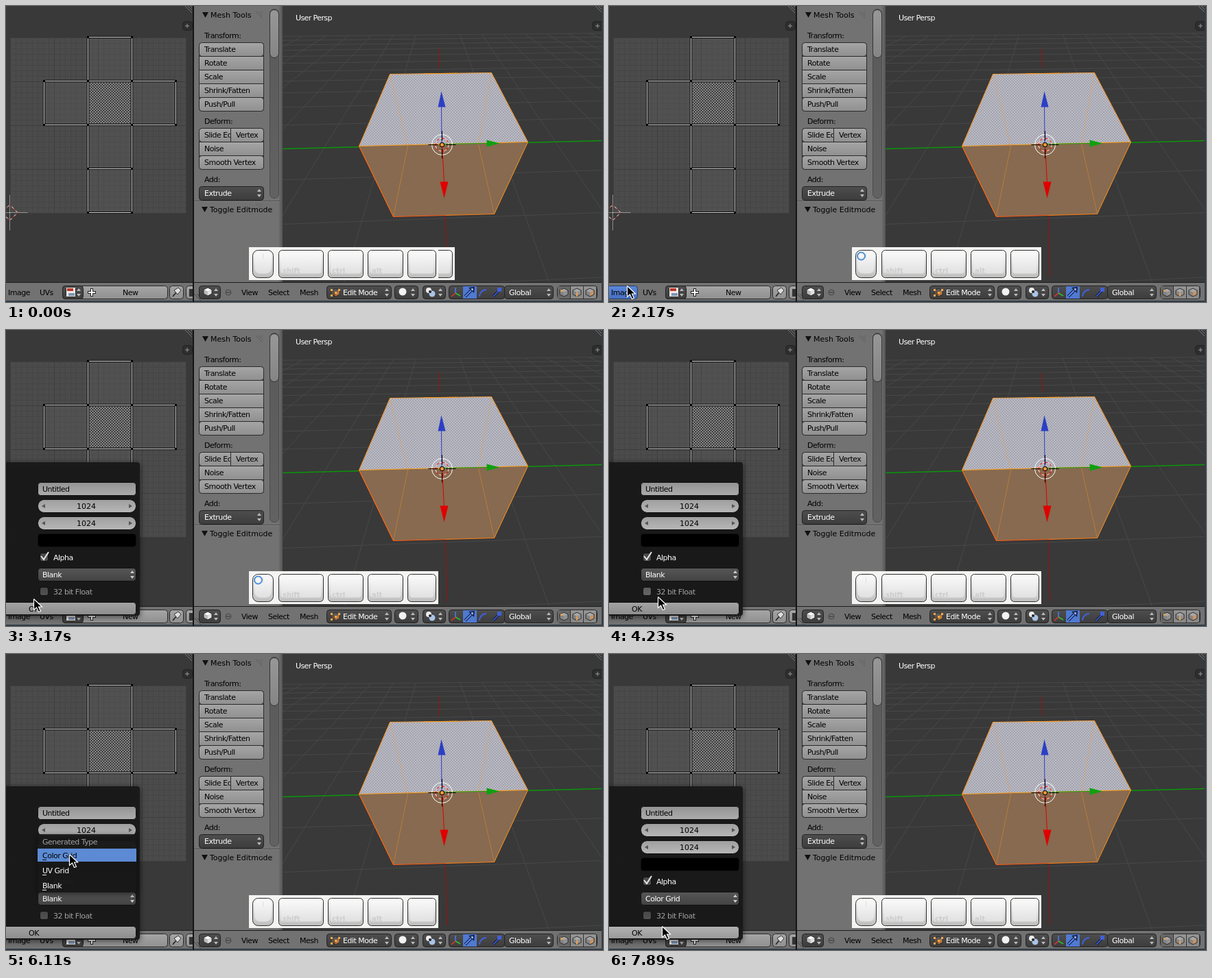
An HTML page with a canvas for the animation above (8 s loop, 870 by 432 pixels).

```html
<!DOCTYPE html>
<html lang="en">
<head>
<meta charset="utf-8">
<title>UV editor</title>
<style>
html, body { margin: 0; width: 100%; height: 100%; overflow: hidden; background: #393939; }
canvas { display: block; }
</style>
</head>
<body>
<canvas id="stage" width="870" height="432"></canvas>
<script>
const W = 870, H = 432, LOOP = 8000;
const screen = document.getElementById('stage').getContext('2d');
let g = screen;

// ---- drawing helpers ----
function rect(x, y, w, h, color) { g.fillStyle = color; g.fillRect(x, y, w, h); }

function line(points, color, width = 1) {
  g.beginPath();
  for (let i = 0; i < points.length; i += 2) g.lineTo(points[i], points[i + 1]);
  g.strokeStyle = color;
  g.lineWidth = width;
  g.stroke();
}

function poly(points, fill) {
  g.beginPath();
  for (let i = 0; i < points.length; i += 2) g.lineTo(points[i], points[i + 1]);
  g.closePath();
  g.fillStyle = fill;
  g.fill();
}

function ring(x, y, r, color, width = 1, dash = []) {
  g.setLineDash(dash);
  g.beginPath();
  g.arc(x, y, r, 0, Math.PI * 2);
  g.strokeStyle = color;
  g.lineWidth = width;
  g.stroke();
  g.setLineDash([]);
}

function disc(x, y, r, color) {
  g.beginPath();
  g.arc(x, y, r, 0, Math.PI * 2);
  g.fillStyle = color;
  g.fill();
}

function box(x, y, w, h, r, top, bottom = top, edge = '#2a2a2a') {
  const fill = g.createLinearGradient(0, y, 0, y + h);
  fill.addColorStop(0, top);
  fill.addColorStop(1, bottom);
  g.beginPath();
  g.roundRect(x + .5, y + .5, w - 1, h - 1, r);
  g.fillStyle = fill;
  g.fill();
  if (edge) { g.strokeStyle = edge; g.lineWidth = 1; g.stroke(); }
}

// y is the middle of the text row
function label(text, x, y, color = '#000', gap = -.5, font = '11px') {
  g.font = font + ' "DejaVu Sans", sans-serif';
  g.letterSpacing = gap + 'px';
  g.fillStyle = color;
  g.fillText(text, x, y + 4);
}

function upDown(x, y, color) {
  poly([x - 3, y - 2, x, y - 6, x + 3, y - 2], color);
  poly([x - 3, y + 2, x, y + 6, x + 3, y + 2], color);
}

function darkBox(x, y, w, h = 20) { box(x, y, w, h, 4, '#4e4e4e', '#3c3c3c', '#222'); }

function plus(x, y, r, color, width = 1) {
  line([x - r, y, x + r, y], color, width);
  line([x, y - r, x, y + r], color, width);
}

function hatch(x, y, color) {
  for (let i = 0; i < 3; i++) line([x + i * 4, y, x + 10, y + 10 - i * 4], color);
}

// sparse diamond lattice of single pixels
function dots(base, dot) {
  const tile = document.createElement('canvas');
  tile.width = tile.height = 4;
  const c = tile.getContext('2d');
  c.fillStyle = base;
  c.fillRect(0, 0, 4, 4);
  c.fillStyle = dot;
  c.fillRect(0, 0, 1, 1);
  c.fillRect(2, 2, 1, 1);
  return g.createPattern(tile, 'repeat');
}

// ---- fixed parts ----
function uvEditor() {
  rect(0, 0, 272, 404, '#393939');
  rect(6, 46, 256, 256, '#4b4b4b');
  for (let i = 0; i <= 32; i++) {
    const p = i * 8, color = i % 8 ? '#454545' : '#3d3d3d';
    rect(6 + p, 46, 1, 256, color);
    rect(6, 46 + p, 256, 1, color);
  }
  const faces = [[119, 45], [119, 109], [55, 109], [183, 109], [119, 173], [119, 237]];
  for (const [x, y] of faces) rect(x, y, 64, 64, 'rgba(255,255,255,.035)');
  rect(120, 110, 63, 63, dots('#505050', '#dcdcdc'));
  for (const [color, width] of [['#0a0a0a', 3], ['#dedede', 1]]) {
    g.strokeStyle = color;
    g.lineWidth = width;
    for (const [x, y] of faces) g.strokeRect(x + .5, y + .5, 64, 64);
  }
  for (const [x, y] of faces)
    for (const dx of [0, 64]) for (const dy of [0, 64]) rect(x + dx - 1, y + dy - 1, 3, 3, '#000');

  g.setLineDash([1, 1]);
  line([5.5, 276, 5.5, 327], '#ddd');
  line([0, 301.5, 32, 301.5], '#ddd');
  const diamond = [5.5, 290, 17, 301.5, 5.5, 313, -6, 301.5, 5.5, 290];
  g.setLineDash([4, 4]);
  line(diamond, '#e02020');
  g.lineDashOffset = 4;
  line(diamond, '#fff');
  g.lineDashOffset = 0;
  g.setLineDash([]);
  hatch(261, 0, '#777');
  box(257, 22, 15, 14, 4, '#2e2e2e', '#2e2e2e', '#222');
  plus(264, 29, 3, '#999');
}

function buttonColumn(y, names) {
  const end = names.length - 1;
  box(281, y, 95, names.length * 20 + 1, 4, '#9a9a9a');
  names.forEach((name, i) => {
    box(281, y + i * 20, 95, 21, i % end ? 0 : 4, '#a6a6a6', '#8f8f8f');
    label(name, 289, y + 10 + i * 20);
  });
}

function toolShelf() {
  rect(274, 0, 129, 404, '#727272');
  poly([286, 9, 295, 9, 290.5, 17], '#111');
  label('Mesh Tools', 298, 13, '#000', 0);
  label('Transform:', 289, 43);
  label('Deform:', 289, 168);
  label('Add:', 289, 253);
  buttonColumn(53, ['Translate', 'Rotate', 'Scale', 'Shrink/Fatten', 'Push/Pull']);
  buttonColumn(178, ['', 'Noise', 'Smooth Vertex']);
  g.save();
  g.beginPath();
  g.rect(281, 178, 46, 20);
  g.clip();
  label('Slide Edge', 289, 188);
  g.restore();
  rect(327, 179, 1, 19, '#2a2a2a');
  label('Vertex', 335, 188);
  darkBox(281, 263, 95, 21);
  label('Extrude', 289, 273, '#fff');
  upDown(369, 273, '#bbb');

  rect(274, 284, 129, 120, '#727272');
  rect(274, 284, 125, 1, '#555');
  rect(274, 285, 125, 1, '#7e7e7e');
  poly([285, 293, 294, 293, 289.5, 301], '#111');
  label('Toggle Editmode', 297, 297, '#000', 0);
  hatch(364, 8, '#5c5c5c');
  hatch(364, 288, '#646464');
  box(384, 4, 14, 277, 7, '#595959', '#626262', '#4c4c4c');
  box(384, 5, 14, 71, 7, '#979797', '#858585', '#333');
  const edge = g.createLinearGradient(397, 0, 404, 0);
  edge.addColorStop(0, 'rgba(70,70,70,0)');
  edge.addColorStop(1, 'rgba(70,70,70,.8)');
  rect(397, 0, 6, 404, edge);
}

// ground plane to screen: a runs along green, b along red
function ground(a, b) {
  const u = a * .00835, v = b * .147, w = 1 + u + v;
  return [(635 + u * 10700 + v * 626) / w, (202 - 57 * (u + v)) / w];
}

function view3d() {
  g.save();
  g.beginPath();
  g.rect(403, 0, 467, 404);
  g.clip();
  rect(403, 0, 467, 404, '#393939');
  for (let i = -16; i <= 16; i++) {
    if (i) line([...ground(i, -5.5), ...ground(i, 11)], '#484848');
    if (i && i > -6 && i < 12) line([...ground(-16, i), ...ground(16, i)], '#484848');
  }
  g.translate(.5, .5);
  line([403, 208, 870, 196], '#0a960a', 1.3);
  line([630, 62, 631, 90], '#a01010');
  line([640, 306, 642, 395], '#a01010');

  poly([559, 99, 707, 97, 760, 198, 514, 204], dots('#a4a4b0', '#fff'));
  poly([514, 204, 760, 198, 711, 303, 564, 307], '#876a50');
  line([559, 99, 585, 204, 564, 307], 'rgba(255,150,30,.4)');
  line([707, 97, 688, 201, 711, 303], 'rgba(255,150,30,.4)');
  line([559, 99, 707, 97], '#f0a040');
  line([608, 98.3, 657, 97.7], '#ff9a14');
  line([564, 307, 514, 204, 559, 99], '#ff9418');
  line([707, 97, 760, 198, 711, 303], '#ff9418');
  line([514, 204, 760, 198], '#ffa01c');
  line([514, 204, 564, 307, 640, 305], '#ff5a12');
  line([640, 305, 711, 303], '#ff8016');

  line([634.5, 201, 634, 145], '#2c3fc4');
  poly([634, 124, 640, 147, 629, 147], '#2c3fc4');
  line([635, 201, 702, 200], '#0fa00f');
  poly([719, 200, 700, 195, 700, 205], '#0fa00f');
  line([635, 202, 638, 258], '#e00000');
  poly([638, 280, 632, 256, 644, 256], '#e00000');
  ring(635, 202, 15, '#fff');
  ring(635, 202, 9.5, '#f00');
  ring(635, 202, 9.5, '#fff', 1, [4, 4]);
  line([615, 202, 629, 202], '#000');
  line([641, 202, 655, 202], '#000');
  line([635, 182, 635, 196], '#000');
  line([635, 208, 635, 222], '#000');
  disc(635, 202, 3.5, '#000');
  disc(635, 202, 2.5, '#ff9a3c');
  g.translate(-.5, -.5);

  label('User Persp', 422, 17, '#fff', -.6);
  hatch(859, 0, '#777');
  box(854, 22, 16, 14, 4, '#2e2e2e', '#2e2e2e', '#222');
  plus(862, 29, 3, '#999');
  g.restore();
}

function cube(x, y, top, side, front) {
  poly([x, y - 6, x + 6, y - 3, x, y, x - 6, y - 3], top);
  poly([x - 6, y - 3, x, y, x, y + 6, x - 6, y + 3], side);
  poly([x + 6, y - 3, x, y, x, y + 6, x + 6, y + 3], front);
  line([x - 6, y - 3, x, y - 6, x + 6, y - 3, x + 6, y + 3, x, y + 6, x - 6, y + 3, x - 6, y - 3], '#2e2e2e');
}

function outlined(points, color, width) {
  line(points, '#101a40', width + 2);
  line(points, color, width);
}

function headers() {
  rect(0, 403, W, 29, '#1d1d1d');
  rect(0, 404, 272, 26, '#727272');
  rect(274, 404, 594, 26, '#727272');
  rect(0, 430, W, 2, '#323c48');

  label('Image', 3, 418);
  label('UVs', 49, 418);
  box(82, 408, 154, 20, 4, '#a6a6a6', '#8f8f8f');
  darkBox(82, 408, 31);
  box(87, 410, 15, 15, 1, '#f0e8e4');
  rect(89, 412, 9, 4, '#b8392c');
  rect(91, 419, 9, 4, '#7d96b4');
  upDown(106, 418, '#bbb');
  plus(125, 418, 6, '#222', 4);
  plus(125, 418, 5, '#fff', 2);
  label('New', 170, 418);
  box(238, 408, 21, 20, 4, '#a6a6a6', '#8f8f8f');
  line([243, 424, 248, 418], '#222', 1.5);
  poly([245, 415, 251, 411, 255, 415, 250, 421], '#ddd');
  line([245, 415, 251, 411, 255, 415, 250, 421, 245, 415], '#333');
  box(262, 408, 16, 20, 4, '#a6a6a6', '#8f8f8f');
  rect(267, 413, 5, 11, '#333');
  rect(272, 0, 2, 432, '#151515');
  rect(274, 404, 8, 26, '#727272');
  hatch(274, 420, '#444');

  darkBox(281, 408, 32);
  cube(294, 417, '#fff', '#bbb', '#e2e2e2');
  upDown(306, 418, '#bbb');
  ring(324, 418, 4, '#444');
  line([321, 418, 327, 418], '#333');
  label('View', 343, 418);
  label('Select', 382, 418);
  label('Mesh', 428, 418);
  darkBox(467, 408, 95);
  cube(480, 418, '#5b5b5b', '#6b5038', '#c07a38');
  for (const [x, y] of [[474, 414], [485, 414], [480, 418], [474, 422]]) rect(x - 1, y - 1, 3, 3, '#ffa850');
  label('Edit Mode', 491, 418, '#fff');
  upDown(555, 418, '#bbb');
  darkBox(566, 408, 35);
  disc(578, 417, 5.5, '#f2f2f2');
  upDown(593, 418, '#bbb');
  darkBox(607, 408, 34);
  disc(616, 415, 4, '#eee');
  disc(621, 420, 4.5, '#a9c4e6');
  disc(618, 417, 2, '#222');
  upDown(633, 418, '#bbb');

  darkBox(645, 408, 82);
  rect(666, 409, 20, 18, '#5079d0');
  line([655, 411, 655, 419], '#4a78f0', 1.6);
  line([655, 419, 662, 423], '#30c030', 1.6);
  line([655, 419, 649, 424], '#f03030', 1.6);
  outlined([669, 424, 680, 413], '#5c8cf0', 2);
  poly([683, 410, 682, 419, 674, 411], '#101a40');
  poly([681, 412, 680.5, 416, 677, 412.5], '#a8c6ff');
  g.beginPath();
  g.arc(700, 424, 10, Math.PI, Math.PI * 1.5);
  g.strokeStyle = '#4060d8';
  g.lineWidth = 2;
  g.stroke();
  outlined([710, 424, 719, 415], '#4060d8', 1.6);
  rect(716, 411, 6, 6, '#4060d8');
  darkBox(726, 408, 72);
  label('Global', 733, 418, '#fff');
  upDown(791, 418, '#bbb');
  box(803, 408, 59, 20, 4, '#969696', '#868686');
  rect(804, 409, 19, 18, '#686868');
  for (let i = 0; i < 3; i++) {
    cube(813 + i * 19, 418, '#a8a8a8', '#858585', i === 2 ? '#c89468' : '#929292');
    rect(822 + i * 19, 409, 1, 18, '#333');
  }
  rect(808, 414, 3, 3, '#e8a050');
  line([832, 418, 832, 424], '#e8a050', 2);
  rect(868, 0, 2, H, '#323c48');
}

function key(x, w, name) {
  box(x, 356, w, 41, 5, '#fdfdfd', '#bdbdbd', '#2c2c2c');
  box(x + 3, 357, w - 6, 34, 4, '#fbfbfb', '#e0e0e0', null);
  if (name) label(name, x + 6, 386, '#cdcdcd', 0, 'bold 10px');
}

function keyStrip(wide) {
  rect(354, 352, wide ? 300 : 276, 48, '#f4f4f2');
  box(359, 356, 31, 41, 8, '#fdfdfd', '#bdbdbd', '#2c2c2c');
  box(362, 357, 25, 34, 8, '#fbfbfb', '#e0e0e0', null);
  line([374.5, 361, 374.5, 369], '#ddd');
  key(397, 66, 'shift');
  key(469, 52, 'ctrl');
  key(527, 52, 'alt');
  key(585, 42);
  if (!wide) return;
  g.save();
  g.beginPath();
  g.rect(630, 352, 24, 48);
  g.clip();
  key(612, 39);
  g.restore();
}

// ---- popups ----
function popup(x, y, w, h, alpha) {
  g.save();
  g.shadowColor = 'rgba(0,0,0,.6)';
  g.shadowBlur = 8;
  g.shadowOffsetY = 2;
  g.beginPath();
  g.roundRect(x, y, w, h, 4);
  g.fillStyle = `rgba(25,25,25,${alpha})`;
  g.fill();
  g.restore();
}

function menu() {
  popup(-6, 360, 160, 44, .96);
  rect(0, 383, 153, 20, '#5680c8');
  label('Open Image', 24, 371, '#fff');
  label('Alt O', 118, 371, '#fff');
  label('New Image', 24, 393);
  label('Alt N', 118, 393);
}

function numberField(y) {
  box(46, y, 144, 20, 9, '#9e9e9e', '#b8b8b8', '#111');
  poly([52, y + 10, 57, y + 7, 57, y + 13], '#555');
  poly([184, y + 10, 179, y + 7, 179, y + 13], '#555');
  label('1024', 103, y + 10, '#000', 0);
}

function checkbox(y, hot) {
  box(49, y, 13, 13, 3, hot ? '#5c5c5c' : '#474747', hot ? '#666' : '#525252', '#111');
}

function dialog(x, y, open, choice) {
  const over = (top, bottom) => !open && y >= top && y < bottom;
  popup(-10, 193, 205, 224, .965);
  box(46, 222, 144, 20, 4, '#929292', '#adadad', '#111');
  label('Untitled', 53, 232);
  numberField(247);
  numberField(272);
  box(46, 297, 144, 20, 4, '#000', '#000', '#111');
  checkbox(325, over(322, 342));
  line([51, 330, 55, 335, 62, 324], '#e6e6e6', 2);
  label('Alpha', 69, 332, '#fff');
  const lit = over(347, 367);
  box(46, 347, 144, 20, 4, lit ? '#666' : '#575757', lit ? '#505050' : '#424242', '#111');
  label(choice, 53, 357, '#fff');
  upDown(184, 357, '#ccc');
  checkbox(375, over(372, 392));
  label('32 bit Float', 69, 382, '#a2a2a2');
  const hot = over(397, 416);
  box(-20, 397, 210, 19, 4, hot ? '#b2b2b2' : '#a4a4a4', hot ? '#999' : '#8c8c8c', '#111');
  label('OK', 33, 407);
}

function typeList(active) {
  popup(46, 263, 144, 85, .94);
  label('Generated Type', 53, 274, '#a0a0a0');
  ['Color Grid', 'UV Grid', 'Blank'].forEach((name, i) => {
    const y = 294 + i * 22, color = i === active ? '#000' : '#fff';
    if (i === active) rect(46, y - 10, 144, 19, '#5c8ad4');
    label(name, 53, y, color);
    rect(53, y + 6, 6, 1, color);
  });
}

// ---- pointer ----
// start, end, steps, then the place reached
const moves = [
  [480, 480, 1, 850, 6], [540, 900, 6, 459, 137], [960, 1180, 5, 155, 272],
  [1320, 1870, 14, 18, 406], [2020, 2020, 1, 26, 408], [2280, 2690, 6, 40, 392],
  [3260, 3260, 1, 43, 390], [3400, 3400, 1, 43, 389], [3550, 3550, 1, 42, 388],
  [3710, 4080, 7, 70, 385], [4230, 4400, 3, 74, 398], [4470, 4800, 6, 95, 327],
  [4860, 4930, 2, 98, 347], [5050, 5050, 1, 99, 351], [5370, 5800, 7, 94, 268],
  [5870, 6110, 4, 92, 292], [6570, 6780, 5, 92, 308], [6970, 6970, 1, 91, 311],
  [7150, 7890, 9, 77, 397]
];
const presses = [[2170, 2360], [2940, 3260], [5140, 5370], [6350, 6570]];
const within = (t, a, b) => t >= a && t < b;

function pointerAt(t) {
  let x = 850, y = 6;
  for (const [start, end, steps, tx, ty] of moves) {
    if (t < start) break;
    const done = t >= end ? 1 : (Math.floor((t - start) / (end - start) * (steps - 1)) + 1) / steps;
    x += (tx - x) * done;
    y += (ty - y) * done;
  }
  return [Math.round(x), Math.round(y)];
}

function pointer(x, y, cross) {
  if (cross) {
    plus(x + .5, y + .5, 9.5, '#fff', 4);
    plus(x + .5, y + .5, 8.5, '#000', 2);
    return;
  }
  const shape = [0, 0, 0, 16, 4, 12.5, 7, 19, 10, 18, 7, 11.5, 12, 11.5, 0, 0];
  g.save();
  g.translate(x + .5, y + .5);
  poly(shape, '#000');
  line(shape, '#fff', 1.2);
  g.restore();
}

// ---- frame ----
const still = document.createElement('canvas');
still.width = W;
still.height = H;
g = still.getContext('2d');
uvEditor();
view3d();
toolShelf();
headers();
g = screen;

function draw(t) {
  const [x, y] = pointerAt(t);
  g.drawImage(still, 0, 0);
  keyStrip(t < 190);
  if (presses.some(([a, b]) => within(t, a, b))) ring(367.5, 365, 5.5, '#4f8fd8', 2);
  if (within(t, 2020, 3170)) {
    box(-8, 408, 50, 20, 4, '#5a88dc', '#4670c0', '#263a60');
    label('Image', 3, 418);
  }
  if (within(t, 2280, 3170)) menu();
  if (t >= 3170) {
    const open = within(t, 5210, 6520);
    dialog(x, y, open, t < 6520 ? 'Blank' : 'Color Grid');
    if (open) typeList(y >= 327 ? 2 : y >= 305 ? 1 : 0);
  }
  if (t >= 480) pointer(x, y, t < 2020 && y < 404 && !within(x, 272, 403));
}

const begin = performance.now();
function tick() {
  draw((performance.now() - begin) % LOOP);
  requestAnimationFrame(tick);
}
tick();
</script>
</body>
</html>
```
